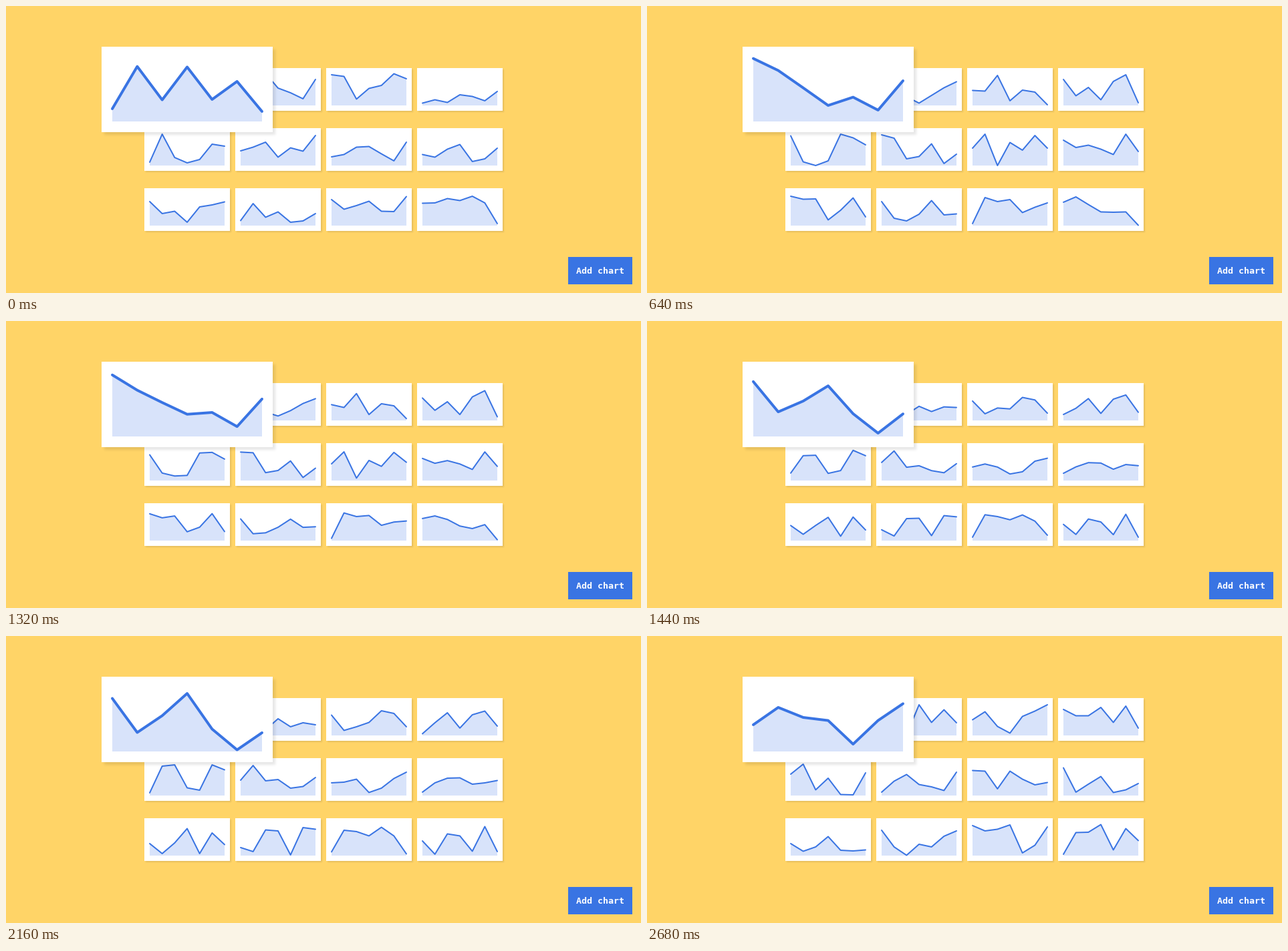
These frames come from a looping animation (950x430 px, 3.04 s). A matplotlib script:

```python
import numpy as np
import matplotlib.pyplot as plt
from matplotlib.animation import FuncAnimation
from matplotlib.patches import Polygon, Rectangle

WIDTH, HEIGHT, DPI = 950, 430, 100
PX = 72 / DPI
LOOP, STEP = 3040, 40
FIRST_SHUFFLE, SHUFFLE_EVERY, MORPH = 133.5, 1000, 520

YELLOW, BLUE, PALE_BLUE = "#ffd467", "#3974e3", "#d8e3fa"
CARD_W, CARD_H, PAD = 128, 64, 8

fig = plt.figure(figsize=(WIDTH / DPI, HEIGHT / DPI), dpi=DPI, facecolor=YELLOW)
ax = fig.add_axes([0, 0, 1, 1])
ax.set_axis_off()


def ease(t, x1=0.77, x2=0.175):
    """Cubic Bezier ease-in-out with handles (x1, 0) and (x2, 1)."""
    u = np.linspace(0, 1, 400)
    x = 3 * (1 - u) ** 2 * u * x1 + 3 * (1 - u) * u ** 2 * x2 + u ** 3
    return np.interp(t, x, 3 * u ** 2 - 2 * u ** 3)


def soft_box(length, margin, sigma):
    """Blurred profile of a bar, sampled at pixel centres."""
    x = np.arange(-margin, length + margin) + 0.5

    def edge(d):
        return 1 / (1 + np.exp(-1.702 * d / sigma))

    return edge(x) * edge(length - x)


def draw_shadow(left, top, w, h, scale, zorder):
    margin, offset, sigma = 6 * scale, 2 * scale, scale
    rgba = np.zeros((h + 2 * margin, w + 2 * margin, 4))
    rgba[..., 3] = 0.1 * np.outer(soft_box(h, margin, sigma),
                                  soft_box(w, margin, sigma))
    x, y = left + offset, top + offset
    ax.imshow(rgba, extent=(x - margin, x + w + margin, y + h + margin, y - margin),
              interpolation="nearest", aspect="auto", zorder=zorder)


class Card:
    """A white card whose chart morphs through a series of data sets."""

    def __init__(self, col, row, *series, scale=1):
        self.series = np.array(series)
        self.scale = scale
        w, h = CARD_W * scale, CARD_H * scale
        left = 207 + 136 * col - (w - CARD_W) // 2
        top = 93 + 90 * row - (h - CARD_H) // 2
        z = 10 * scale
        draw_shadow(left, top, w, h, scale, z)
        ax.add_patch(Rectangle((left, top), w, h, fc="white", lw=0, zorder=z + 1))

        self.base = top + h - PAD * scale
        self.x = np.linspace(left + PAD * scale, left + w - PAD * scale, 7)
        self.area = Polygon([(0, 0)], fc=PALE_BLUE, lw=0, zorder=z + 2)
        ax.add_patch(self.area)
        self.line, = ax.plot([], [], color=BLUE, lw=2 * scale * PX, zorder=z + 3,
                             solid_capstyle="round", solid_joinstyle="round",
                             snap=False)

    def show(self, index, amount):
        heights = self.series[index] * (1 - amount) + self.series[index + 1] * amount
        y = self.base - heights * self.scale
        self.line.set_data(self.x, y)
        self.area.set_xy([(self.x[0], self.base), *zip(self.x, y),
                          (self.x[-1], self.base)])


# Chart values are heights above the base line.
cards = []


def add_card(*args, **kwargs):
    cards.append(Card(*args, **kwargs))


add_card(0, 0,
         (9.5, 41.2, 16.2, 40.8, 16.5, 30, 7.5),
         (47.2, 38.2, 25.2, 12, 18.2, 8.5, 30.5),
         (39.8, 14.2, 26.8, 43.5, 16.8, 1.2, 14),
         (20, 33, 25.5, 23.2, 5.5, 23.2, 35.8), scale=2)
add_card(1, 0,
         (20, 30, 48, 26, 19, 10, 39),
         (30, 20, 13, 3.5, 15, 26.5, 35.5),
         (20, 30, 8.5, 25, 13, 19, 16),
         (30, 20, 1, 46, 19.5, 38.5, 19))
add_card(2, 0,
         (46, 43.5, 9.5, 25.5, 30, 47.5, 40),
         (22.5, 21.5, 45, 7, 23, 20, 1),
         (30.5, 7.5, 13, 19.5, 37, 33, 13),
         (23.5, 35.5, 13.5, 3.5, 28.5, 36.5, 46))
add_card(3, 0,
         (3.5, 8.5, 4.5, 16, 13.5, 7, 21),
         (39, 14.5, 27, 8.5, 36, 46, 4),
         (2.5, 19, 34, 11, 31, 36.5, 14),
         (39, 29.5, 29.5, 42, 19.5, 44, 11))
add_card(0, 1,
         (5, 47, 12, 4, 9, 32, 29),
         (44.5, 5.5, 0, 7, 47, 41.5, 31),
         (4, 44, 46, 11.5, 8, 46, 38.5),
         (32, 47, 8.5, 26, 1.5, 1, 34))
add_card(1, 1,
         (22, 27.5, 35, 12.5, 26.5, 21.5, 45),
         (46, 41, 10, 13.5, 32.5, 3, 17),
         (23, 45, 22, 24, 11, 13.5, 27),
         (5, 21.5, 31.5, 16.5, 13, 7.5, 35))
add_card(2, 1,
         (13, 16.5, 27.5, 28.5, 17.5, 7, 35),
         (26, 47, 0, 34.5, 23, 45, 26),
         (19, 20, 24.5, 4.5, 11, 25.5, 35),
         (37.5, 36.5, 10, 36.5, 24.5, 16, 19.5))
add_card(3, 1,
         (16.5, 12.5, 24.5, 31.5, 6, 10, 26),
         (38, 27, 30.5, 24.5, 16.5, 47, 21),
         (5, 19, 26, 26.5, 17, 19, 22.5),
         (41.5, 5, 17, 28.5, 4.5, 8.5, 18))
add_card(0, 2,
         (36, 18, 21.5, 5, 28, 31, 35.5),
         (44, 39.5, 40, 8.5, 23, 41.5, 13),
         (18, 3, 19, 40.5, 3, 34, 16.5),
         (18, 6.5, 13, 28.5, 8, 7, 8.5))
add_card(1, 2,
         (7.5, 33, 12.5, 20.5, 5, 7, 18),
         (36, 11, 7, 17, 37.5, 16, 17.5),
         (12, 6, 38.5, 37, 1, 42, 39.5),
         (38, 13, 0.5, 17, 13, 29, 37))
add_card(2, 2,
         (39, 24.5, 30, 36.5, 21.5, 21, 43.5),
         (3, 42, 36, 39, 19.5, 27.5, 34),
         (5.5, 38, 36, 29.5, 42.5, 29.5, 2.5),
         (45, 37, 39.5, 46, 4, 15.5, 43))
add_card(3, 2,
         (33.5, 34, 40.5, 37.5, 44, 34, 3),
         (35, 43, 31.5, 20.5, 20, 20.5, 0.5),
         (22, 2, 32.5, 29.5, 6.5, 43.5, 6),
         (2, 34.5, 35, 46.5, 8.5, 40.5, 22.5))

ax.add_patch(Rectangle((841, 376), 96, 41, fc=BLUE, lw=0, zorder=40))
ax.text(853, 401, "Add chart", color="white", family="DejaVu Sans Mono",
        weight="bold", size=13.333 * PX, va="baseline", zorder=41)

ax.set_xlim(0, WIDTH)
ax.set_ylim(HEIGHT, 0)


def update(frame):
    elapsed = frame * STEP - FIRST_SHUFFLE
    index = int(np.clip(elapsed // SHUFFLE_EVERY, 0, 2))
    progress = (elapsed - index * SHUFFLE_EVERY) / MORPH
    amount = ease(np.clip(progress, 0, 1))
    for card in cards:
        card.show(index, amount)
    return []


anim = FuncAnimation(fig, update, frames=LOOP // STEP, interval=STEP,
                     repeat=True, repeat_delay=0, blit=False)
plt.show()
```
